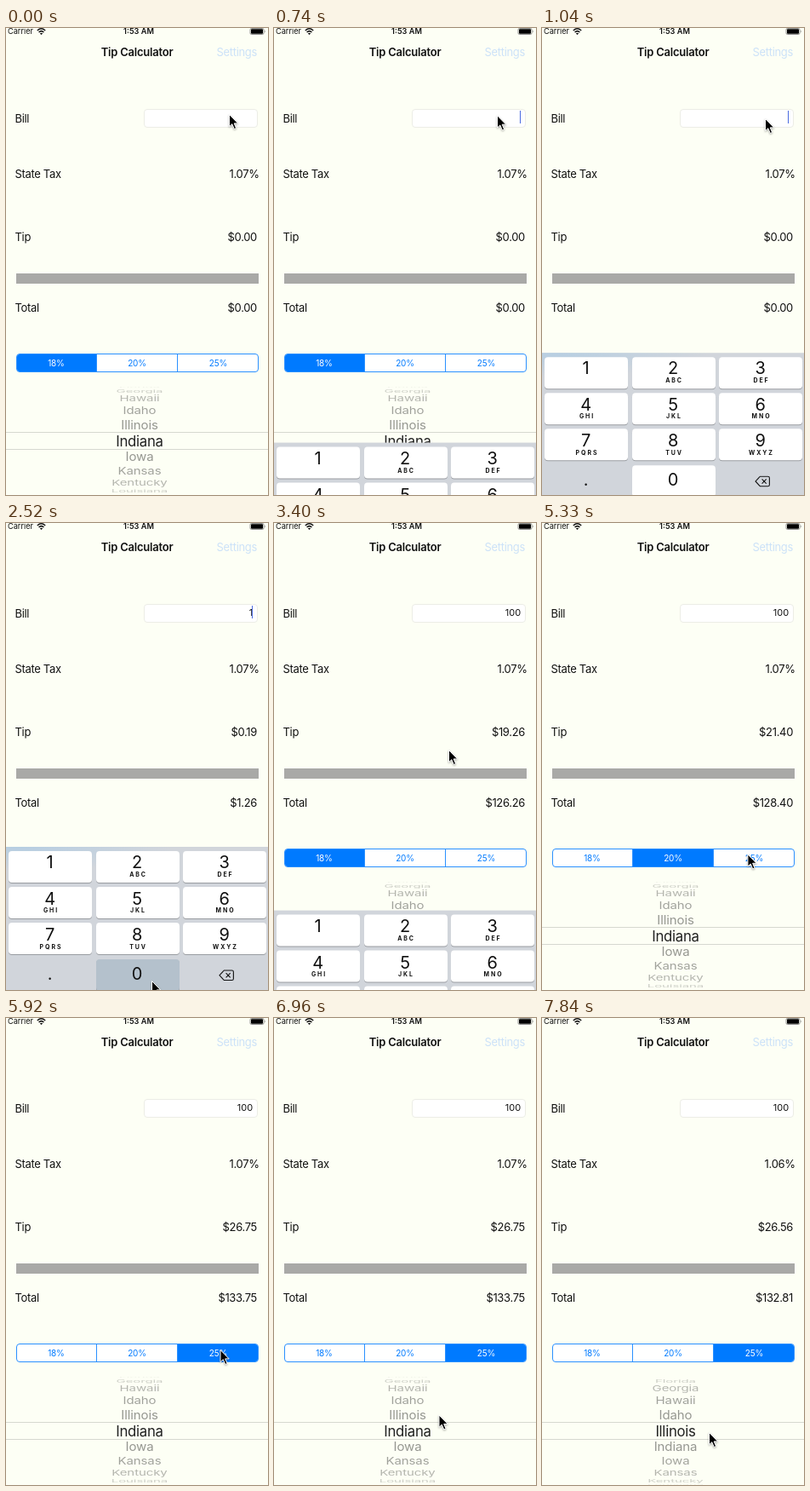
These frames come from a looping animation (308x548 px, 7.99 s). An HTML page:

```html
<!DOCTYPE html>
<html lang="en">
<head>
<meta charset="utf-8">
<title>Tip Calculator</title>
<style>
html, body { margin: 0; width: 100%; height: 100%; overflow: hidden; background: #fdfff5; }
#stage {
  position: absolute; left: 0; top: 0; width: 308px; height: 548px; overflow: hidden;
  background: #fdfff5; color: #111; font: 13px/20px Inter, "Open Sans", sans-serif; letter-spacing: -.33px;
}
#stage * { box-sizing: border-box; }
#stage div, #stage svg { position: absolute; white-space: nowrap; }
.label { left: 10.5px; }
.value { right: 13px; }
.mid { left: 0; width: 308px; text-align: center; font-weight: 600; }
.title { top: 17.5px; letter-spacing: -.22px; }
.status { font-size: 9.2px; letter-spacing: 0; top: -6.5px; }
#field {
  left: 162px; top: 94.5px; width: 134px; height: 22px; border: 1px solid #ecede6;
  border-radius: 4px; background: #fff;
}
#bill { right: 17.8px; top: 94.6px; font-size: 11px; letter-spacing: 0; }
#caret { left: 289px; top: 97px; width: 1px; height: 15px; background: #4a6be0; }
#bar { left: 12px; top: 288px; width: 285px; height: 11.5px; background: #a9a9a7; }
#segments {
  left: 12px; top: 382px; width: 285px; height: 22px; border: 1px solid #2a90ff;
  border-radius: 4px; overflow: hidden; background: #fff;
}
.seg {
  top: 0; width: 95px; height: 20px; line-height: 21px; text-align: center;
  font-size: 10px; letter-spacing: -.2px; color: #007aff; border-right: 1px solid #2a90ff;
}
.seg:last-child { border: 0; }
.seg.down { background: #d8e8f4; }
.seg.on { background: #007aff; color: #fff; }
#wheel { left: 0; top: 416px; width: 308px; height: 132px; overflow: hidden; }
#band {
  left: 0; top: 474px; width: 308px; height: 21px; overflow: hidden; background: #fdfff5;
  border: solid #d6d8d0; border-width: 1px 0;
}
.row { left: 3px; width: 308px; text-align: center; font-size: 15px; letter-spacing: -.1px; }
.row.big { font-size: 16.8px; letter-spacing: -.3px; color: #222; }
#pad { left: 0; top: 380px; width: 308px; height: 170px; background: #d1d5db; letter-spacing: 0; }
#tint {
  left: 0; top: 0; width: 200px; height: 30px;
  background: radial-gradient(ellipse 180px 28px at 15px 0, #b6cee2, #d1d5db00);
}
.key { width: 98px; height: 37px; border-radius: 4px; text-align: center; font-size: 20px; }
.key.cap { background: #fff; box-shadow: 0 1px 0 #999ca1; }
.key.down { background: #b4c1cc; }
.key div { left: -.4px; width: 98px; }
.key .sub { top: 18.4px; left: 1px; font-size: 7px; font-weight: 700; letter-spacing: 1.9px; }
#arrow { left: 0; top: 0; overflow: visible; filter: drop-shadow(0 1px 1px #0005); }
</style>
</head>
<body>
<div id="stage">
  <div class="status" style="left:2px">Carrier</div>
  <svg style="left:36px;top:-.4px" width="11" height="9" fill="none" stroke="#111" stroke-width="1.5">
    <path d="M.8 3Q5.5-1.4 10.2 3M2.6 5Q5.5 2.3 8.4 5"/>
    <path d="M5.5 8L3.8 6.3Q5.5 5 7.2 6.3z" fill="#111" stroke="none"/>
  </svg>
  <div class="status mid" style="left:2px">1:53 AM</div>
  <svg style="left:286px;top:-.5px" width="20" height="9">
    <rect x="1" y=".5" width="16" height="7" rx="1.6" fill="none" stroke="#777" stroke-width=".8"/>
    <rect x="2" y="1.3" width="14" height="5.4" rx=".8"/>
    <path d="M18 2.5q1.4 1.5 0 3z" fill="#777"/>
  </svg>
  <div class="mid title">Tip Calculator</div>
  <div class="value" style="top:17.5px;color:#cce2f8">Settings</div>

  <div class="label" style="top:95.6px">Bill</div>
  <div id="field"></div><div id="bill"></div><div id="caret"></div>
  <div class="label" style="top:160.5px">State Tax</div>
  <div class="value" id="tax" style="top:160.5px;right:10.3px"></div>
  <div class="label" style="top:235px">Tip</div>
  <div class="value" id="tip" style="top:235px"></div>
  <div id="bar"></div>
  <div class="label" style="top:318px">Total</div>
  <div class="value" id="total" style="top:318px"></div>

  <div id="segments"></div>
  <div id="wheel"></div>
  <div id="band"></div>
  <div id="pad"><div id="tint"></div></div>

  <svg id="arrow" width="12" height="19">
    <path d="M0 0V14.2L3.3 11.2L5.8 17L8.1 16L5.7 10.4H10.2z" stroke="#fff"/>
  </svg>
</div>
<script>
const LOOP = 7990, STEP = 148;
const $ = id => document.getElementById(id);
const states = ['Florida', 'Georgia', 'Hawaii', 'Idaho', 'Illinois', 'Indiana', 'Iowa', 'Kansas', 'Kentucky', 'Louisiana'];
const rates = [.18, .2, .25];

const typed = [11, 18, 19];
const picked = [33, 39];
const padUp = 5, padDown = 23, dragStart = 48, dragEnd = 52, settled = 53;

// pointer moves: start, end, x, y
const home = [262.5, 101.5];
const moves = [
  [4, 7, 262.5, 106.5],
  [7, 11, 67.5, 395],
  [13, 17, 171.5, 537.5],
  [19, 21, 205.5, 266.5],
  [25, 29, 187.5, 385.5],
  [33, 37, 252, 389.5],
  [41, 45, 194, 466],
  [dragStart, dragEnd, 196.5, 486.5]
];

const ease = (k, a, b) => {
  const f = Math.min(1, Math.max(0, (k - a) / (b - a)));
  return f * f * (3 - 2 * f);
};
// share of the distance left in a critically damped spring
const rest = w => (1 + w) * Math.exp(-w);
const within = (k, a, b) => k >= a && k < b;
const passed = (times, k) => times.filter(t => t <= k).length;

function add(parent, cls, text = '') {
  const el = document.createElement('div');
  el.className = cls;
  el.textContent = text;
  parent.append(el);
  return el;
}

const segs = rates.map((r, i) => {
  const el = add($('segments'), 'seg', Math.round(r * 100) + '%');
  el.style.left = i * 95 - 1 + 'px';
  return el;
});

const rows = states.map(s => add($('wheel'), 'row', s));
const bigRows = states.map(s => add($('band'), 'row big', s));

const subs = ' ABC DEF GHI JKL MNO PQRS TUV WXYZ'.split(' ');
const keys = [...'123456789.0', ''].map((ch, i) => {
  const plain = i === 9 || i === 11;
  const el = add($('pad'), plain ? 'key' : 'key cap');
  el.style.left = 3 + (i % 3) * 102.5 + 'px';
  el.style.top = 4.7 + Math.floor(i / 3) * 42.3 + 'px';
  add(el, '', ch).style.top = (i < 9 ? 3.5 : 7.3) + 'px';
  if (subs[i]) add(el, 'sub', subs[i]);
  return el;
});
keys[11].innerHTML = `<svg style="left:41.6px;top:12px" width="19" height="14" fill="none" stroke="#111" stroke-width="1.1">
  <path d="M6.3 1H15.6Q17.4 1 17.4 2.8V10.7Q17.4 12.5 15.6 12.5H6.3L1 6.75zM8.6 4.2L13.7 9.3M13.7 4.2L8.6 9.3"/></svg>`;

function padDrop(k) {
  if (k < padUp) return 1;
  if (k < padDown) return rest(1.3 + 2.85 * (k - padUp));
  return 1 - rest(1.49 + 2.85 * (k - padDown));
}

function pointer(k) {
  let [x, y] = home;
  for (const [a, b, u, v] of moves) {
    const f = ease(k, a, b);
    x += (u - x) * f;
    y += (v - y) * f;
  }
  return [x, y];
}

function drawWheel(center) {
  states.forEach((s, i) => {
    const n = i - center, a = n * .3;
    const c = Math.max(Math.cos(a), 0);
    rows[i].style.opacity = .45 * c ** .8;
    rows[i].style.transform = `translateY(${58.5 + 63 * Math.sin(a)}px) scaleY(${c})`;
    bigRows[i].style.transform = `translateY(${n * 19.5 - .3}px)`;
  });
}

function draw(now) {
  const k = Math.floor((now % LOOP + 8) / STEP);
  const bill = '100'.slice(0, passed(typed, k));
  const rate = passed(picked, k);
  const tax = k < settled ? 1.07 : 1.0625;
  const sum = bill * tax, tip = sum * rates[rate];

  $('bill').textContent = bill;
  $('tax').textContent = tax.toFixed(2) + '%';
  $('tip').textContent = '$' + tip.toFixed(2);
  $('total').textContent = '$' + (sum + tip).toFixed(2);
  $('caret').style.visibility = within(k, padUp, padDown) ? '' : 'hidden';

  segs.forEach((el, i) => {
    el.classList.toggle('on', i === rate);
    el.classList.toggle('down', i > 0 && within(k, picked[i - 1] - 2, picked[i - 1]));
  });
  keys[0].classList.toggle('down', within(k, 10, 12));
  keys[10].classList.toggle('down', within(k, 17, 19));

  const drop = padDrop(k);
  $('pad').style.transform = `translateY(${drop * 170}px)`;
  $('tint').style.opacity = Math.max(0, 1 - drop * 3);

  drawWheel(states.indexOf('Indiana') - ease(k, dragStart, dragEnd));

  const [x, y] = pointer(k);
  $('arrow').style.transform = `translate(${x}px, ${y}px)`;
}

function tick() {
  draw(performance.now());
  requestAnimationFrame(tick);
}
tick();
</script>
</body>
</html>
```
